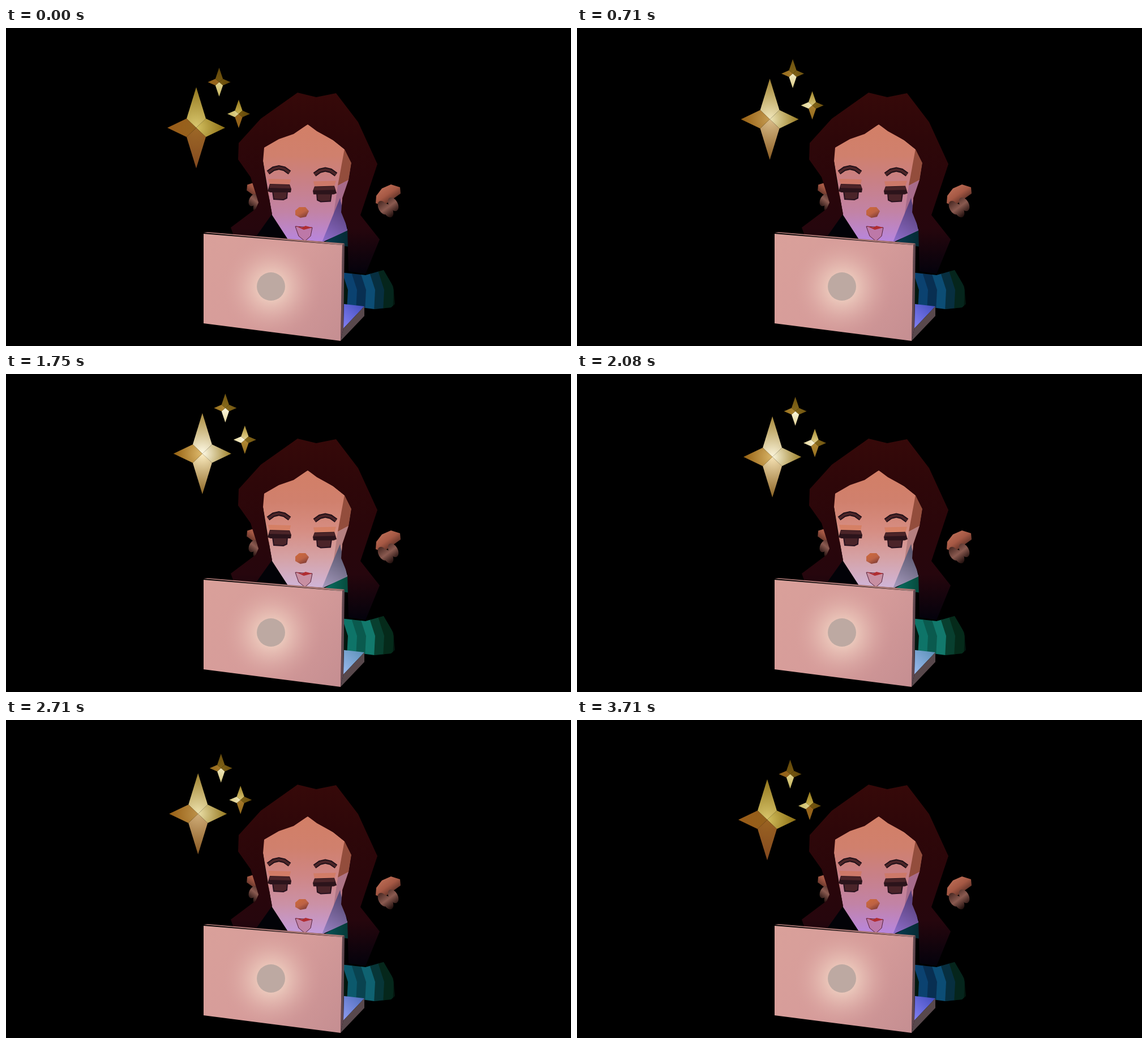
These frames come from a looping animation (998x561 px, 3.75 s). An HTML page with a canvas:

```html
<!DOCTYPE html>
<html lang="en">
<head>
<meta charset="utf-8">
<title>Late night laptop</title>
<style>
html, body { margin: 0; height: 100%; overflow: hidden; background: #000; }
canvas { display: block; }
</style>
</head>
<body>
<canvas id="stage" width="998" height="561"></canvas>
<script>
const LOOP = 3750;
const ctx = document.getElementById('stage').getContext('2d');

const smooth = v => { v = Math.max(0, Math.min(1, v)); return v * v * (3 - 2 * v); };
const ramp = (t, from, to) => smooth((t - from) / (to - from));

// Blend two #rrggbb colours
function mix(a, b, k) {
  const channel = (c, i) => parseInt(c.slice(i, i + 2), 16);
  const at = i => Math.round(channel(a, i) * (1 - k) + channel(b, i) * k);
  return `rgb(${at(1)},${at(3)},${at(5)})`;
}

function addStops(gradient, colors) {
  colors.forEach((c, i) => gradient.addColorStop(i / (colors.length - 1), c));
  return gradient;
}
const linear = (x0, y0, x1, y1, ...colors) =>
  addStops(ctx.createLinearGradient(x0, y0, x1, y1), colors);
const radial = (x, y, r, ...colors) =>
  addStops(ctx.createRadialGradient(x, y, 0, x, y, r), colors);

function poly(points, fill, edge) {
  ctx.beginPath();
  points.split(' ').forEach(p => ctx.lineTo(...p.split(',').map(Number)));
  ctx.closePath();
  ctx.fillStyle = fill;
  ctx.fill();
  if (edge) {
    ctx.strokeStyle = edge;
    ctx.stroke();
  }
}

function ellipse(x, y, rx, ry, angle, fill) {
  ctx.beginPath();
  ctx.ellipse(x, y, rx, ry, angle, 0, 7);
  ctx.fillStyle = fill;
  ctx.fill();
}

// Run a drawing in its own coordinates
function place(x, y, sx, sy, paint) {
  ctx.save();
  ctx.translate(x, y);
  ctx.scale(sx, sy);
  paint();
  ctx.restore();
}

// Four kite facets (top, right, bottom, left), each lit from the centre
function star(x, y, w, h, facets) {
  const ix = w / 3, iy = h / 4.4;
  const tips = [[0, -h], [w, 0], [0, h], [-w, 0]];
  const inner = [[-ix, -iy], [ix, -iy], [ix, iy], [-ix, iy]];
  place(x, y, 1, 1, () => facets.forEach(([core, tip], i) =>
    poly([[0, 0], inner[i], tips[i], inner[(i + 1) % 4]].join(' '),
      radial(0, 0, i % 2 ? w : h, core, tip))));
}

function stars(lift) {
  const glow = (a, b) => mix(a, b, Math.sqrt(lift));
  const gold = [glow('#c9b24f', '#e8d795'), glow('#917417', '#a58a30')];
  const pale = [glow('#e3d590', '#fffbe6'), glow('#c6b45c', '#e6d79c')];
  const dark = [glow('#775810', '#866a1c'), glow('#604609', '#725510')];
  const amber = [glow('#98651c', '#b28a35'), glow('#906018', '#96701e')];
  place(11 * lift, -36 * lift, 1, 1, () => {
    star(336, 176, 51, 71.5, [
      [glow('#d9c66c', '#fffbe8'), glow('#92761c', '#a8893a')],
      [glow('#d3bf5e', '#fffbe8'), glow('#8a6d12', '#9c7f28')],
      [glow('#9a6322', '#fff0c4'), glow('#84491f', '#8c6522')],
      [glow('#93601c', '#e0bd70'), glow('#9a5c18', '#94600f')]
    ]);
    star(376.5, 95.5, 20, 25.5, [dark, dark, pale, amber]);
    star(411, 151.5, 20, 25, [gold, pale, amber, dark].map((_, i, f) => f[[0, 3, 2, 1][i]]));
  });
}

function hand(x, y, scale) {
  place(x, y, scale, Math.abs(scale), () => {
    poly('-21,0 -11,-13 5,-20 21,-15 22,-4 -9,18 -22,13',
      linear(-10, -20, 12, 12, '#c07058', '#a55844', '#4a261f'));
    for (let i = 0; i < 3; i++) {
      ellipse(9 - 9 * i, 15 + 8 * (i % 2) + 3 * i, 8, 13, -.5,
        linear(-8, 5, 12, 32, '#4a2a24', '#8a5a50', '#251210'));
    }
  });
}

function shirt(tint) {
  poly('440,366 470,328 505,378', '#020207');
  poly('560,379 605,353 607,386', linear(570, 0, 605, 0, tint('#07384c', '#08695c'), tint('#052a33', '#064a3c')));
  ctx.save();
  poly('590,431 635,436 667,427 684,456 687,487 680,493 651,496 590,488', '#03170f');
  ctx.clip();
  const blue = ['#0b4270', '#082f52', '#0c4d75', '#072f40', '#05251c'];
  const teal = ['#0e7468', '#0a5a4e', '#12796c', '#083f2f', '#052a1a'];
  blue.forEach((c, i) => {
    const x = 592 + 16 * i;
    poly(`${x},425 ${x + 17},425 ${x + 29},462 ${x + 27},500 ${x + 10},500 ${x + 12},462`,
      tint(c, teal[i]));
  });
  ctx.restore();
}

function face(tint) {
  poly('533,170 578,198 598,214 610,238 605,272 592,325 603,357 560,377 498,373 470,330 450,211',
    linear(0, 175, 0, 375, '#d27f67', '#d0806d', tint('#c88088', '#d68d82'),
      tint('#c283a6', '#d5a2a6'), tint('#b886dd', '#d0b4d6')));
  // right temple, cheek and neck
  poly('598,213 610,238 605,268 586,278', '#934d3c');
  poly('586,278 605,268 594,300 578,333', tint('#a76b8b', '#b57f80'));
  poly('590,300 603,357 558,378', linear(600, 320, 565, 375,
    tint('#59407b', '#5c5870'), tint('#8a6bc6', '#a096b8')));
  // nose
  poly('511,322 518,316 529,316 535,323 530,333 520,335 511,330',
    linear(518, 316, 528, 335, '#cb693c', '#bd6244', '#7e3b34'));
  // tongue and upper lip
  poly('511,350 541,352 538,367 528,376 517,367', tint('#bd78a8', '#c88fa2'), '#54203a');
  poly('511,349 523,352 529,349 541,352 526,356', '#b02d32');
}

function eye(open) {
  poly('-19,-24 21,-23 19,-14 -16,-14', 'rgba(212,110,62,.4)');
  // faceted brow arch
  [[8, '#201018'], [4, '#4c2528']].forEach(([width, color]) => {
    ctx.beginPath();
    for (let x = -19; x <= 19; x += 9.5) ctx.lineTo(x, -44 + 9 * (x / 19) ** 2);
    ctx.lineWidth = width;
    ctx.strokeStyle = color;
    ctx.stroke();
  });
  ctx.lineWidth = 2;
  if (open > .02) {
    place(0, -2, 1, open, () => poly('-11,0 15,0 14,12 8,15 -9,14', '#4b2429', '#28121f'));
  }
  place(0, 0, 1, .7 + .3 * open, () => {
    poly('-20,-2 -16,-15 19,-14 22,-6 21,0 -15,0', '#2c141b');
    poly('-16,-14 19,-13 21,-7 -17,-8', '#4b2428');
  });
}

function hair() {
  const shade = linear(0, 115, 0, 433, '#360909', '#2e0709', '#2a060a', '#26060d', '#04020c');
  poly('515,114 548,122 583,115 622,166 656,240 626,330 660,373 635,434 605,429 603,352 592,325 ' +
    '594,300 605,268 610,238 598,214 578,198 549,182 533,170 508,187 482,196 456,211 454,235 ' +
    '459,270 470,328 443,366 402,366 397,352 441,319 446,308 432,263 410,232 411,203 450,160', shade);
}

function laptop(tint) {
  poly('597,487 633,491 596,530',
    linear(596, 525, 630, 490, tint('#7f7df0', '#98b8ec'), tint('#4650c0', '#5f92ba')));
  poly('633,491 633,508 591,552 596,530', '#58484c');
  poly('349,361 356,360 598,380 594,383', '#a87572');
  poly('594,382 598,380 596,530 591,552', '#60474f');
  const lid = '349,363 594,383 591,552 349,521';
  poly(lid, linear(360, 365, 585, 545, '#d9a09a', '#d69c9a', '#c68f92'));
  poly(lid, radial(469, 458, 90, 'rgba(250,232,210,.95)', 'rgba(240,208,194,.4)', 'rgba(214,156,154,0)'));
  ellipse(468, 456, 25, 25, 0, '#bda9a2');
}

function draw(t) {
  const lift = smooth(1 - Math.abs(t - 1640) / 1670);
  const cyan = ramp(t, 1420, 1720) - ramp(t, 2450, 2950);
  const open = 1 - ramp(t, 2290, 2380) + ramp(t, 2480, 2580);
  const tint = (a, b) => mix(a, b, cyan);
  ctx.fillStyle = '#000';
  ctx.fillRect(0, 0, 998, 561);
  stars(lift);
  hand(445, 290, -.9);
  hand(675, 296, 1);
  shirt(tint);
  face(tint);
  hair();
  place(482, 290, 1, 1, () => eye(open));
  place(564, 293.5, -1, 1, () => eye(open));
  laptop(tint);
}

const start = performance.now();
function tick() {
  draw((performance.now() - start) % LOOP);
  requestAnimationFrame(tick);
}
tick();
</script>
</body>
</html>
```
